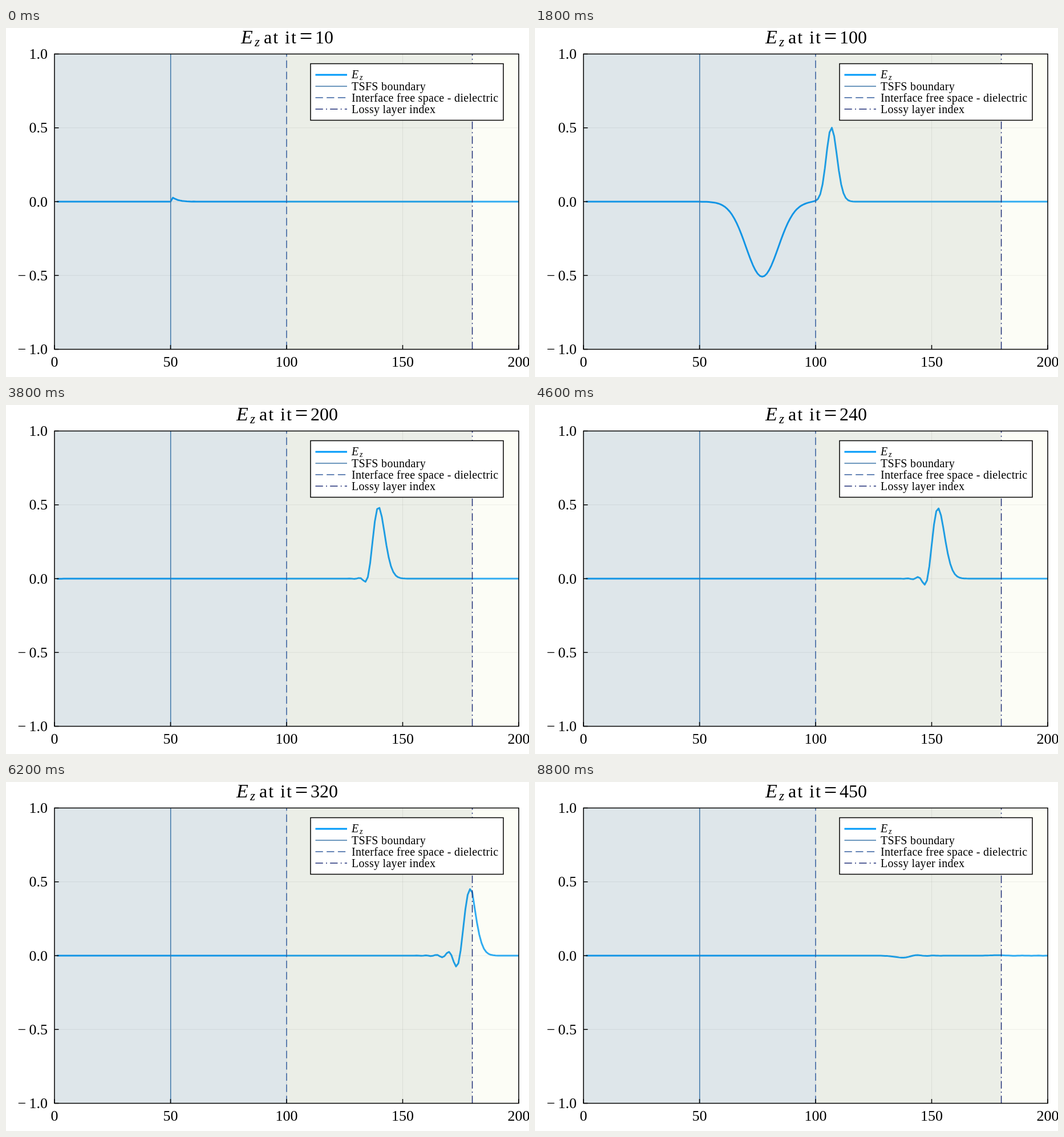
Recreate the animation shown at these times as an HTML page. Size 917x611 px, loop 9000 ms.

```html
<!DOCTYPE html>
<html lang="en">
<head>
<meta charset="utf-8">
<title>FDTD pulse</title>
<style>
  html, body { margin: 0; width: 100%; height: 100%; overflow: hidden; background: #fff; }
  svg { display: block; width: 917px; height: 611px; }
  text { font-family: "Liberation Serif", "Times New Roman", serif; fill: #000; }
  .title { font-size: 32px; }
  .title .word { letter-spacing: 2px; }
  .tick { font-size: 26px; }
  .legend { font-size: 20px; letter-spacing: .3px; }
  .math { font-style: italic; }
  .field { fill: none; stroke: #009af9; stroke-width: 3; stroke-linejoin: round; }
  .grid { fill: none; stroke: #000; stroke-opacity: .1; stroke-width: .8; }
  .frame { fill: none; stroke: #000; stroke-width: 1.5; }
  .mark { fill: none; stroke-width: 1.5; }
  .source { stroke: #3d76a8; }
  .interface { stroke: #355e9f; stroke-dasharray: 13.3 6.4; }
  .lossy { stroke: #202f78; stroke-dasharray: 13.3 5.2 2 5.2; }
</style>
</head>
<body>
<svg viewBox="0 0 917 611">
  <g id="title" class="title">
    <text class="math" x="0" y="27" font-size="34">E</text>
    <text class="math" x="24" y="32" font-size="23">z</text>
    <text class="word" x="40" y="27">at</text>
    <text class="word" x="77" y="27">it</text>
    <text x="114" y="28" font-size="40" text-anchor="middle">=</text>
    <text id="count" x="130" y="27"></text>
  </g>
  <path id="grid" class="grid"/>
  <path id="field" class="field"/>
  <g fill-opacity=".2">
    <rect x="85" y="45.5" width="407" height="517" fill="#5a8296"/>
    <rect x="492" y="45.5" width="325.6" height="517" fill="#9baa87"/>
    <rect x="817.6" y="45.5" width="81.4" height="517" fill="#f0f5d2"/>
  </g>
  <path class="mark source" d="M288.7 562.5V45.5"/>
  <path class="mark interface" d="M492 562.5V45.5"/>
  <path class="mark lossy" d="M817.6 562.5V45.5"/>
  <path id="ticks" class="frame"/>
  <rect class="frame" x="85" y="45.5" width="814" height="517"/>
  <g id="labels" class="tick"></g>
  <rect x="534" y="62.5" width="338" height="99" fill="#fff" stroke="#000" stroke-width="1.5"/>
  <path class="field" d="M542.5 82H598"/>
  <path class="mark source" d="M542.5 102H598"/>
  <path class="mark interface" d="M542.5 122H598"/>
  <path class="mark lossy" d="M542.5 142H598"/>
  <g class="legend">
    <text class="math" x="606" y="88">E<tspan x="620" dy="3" font-size="14">z</tspan></text>
    <text x="606" y="109">TSFS boundary</text>
    <text x="606" y="129">Interface free space - dielectric</text>
    <text x="606" y="149">Lossy layer index</text>
  </g>
</svg>
<script>
const byId = id => document.getElementById(id);
const xOf = cell => 85 + cell * 4.07;
const yOf = value => 304 - value * 258.5;

function drawAxes() {
  let grid = '', ticks = '', labels = '';
  for (let cell = 0; cell <= 200; cell += 50) {
    grid += `M${xOf(cell)} 45.5V562.5`;
    ticks += `M${xOf(cell)} 562.5v-7.5`;
    labels += `<text x="${xOf(cell)}" y="593" text-anchor="middle">${cell}</text>`;
  }
  for (let value = -1; value <= 1; value += 0.5) {
    const minus = value < 0 ? '<tspan letter-spacing="5">−</tspan>' : '';
    grid += `M85 ${yOf(value)}H899`;
    ticks += `M85 ${yOf(value)}h7.5`;
    labels += `<text x="73" y="${yOf(value) + 8.7}" text-anchor="end">${minus}${Math.abs(value).toFixed(1)}</text>`;
  }
  byId('grid').setAttribute('d', grid);
  byId('ticks').setAttribute('d', ticks);
  byId('labels').innerHTML = labels;
}

// One-dimensional FDTD run; cells are numbered from 1, a curve is kept every 10 steps.
function simulate() {
  const size = 200, source = 50, dielectric = 100, lossy = 180;
  const impedance = 377, permittivity = 9, loss = 0.02;
  const ez = new Float64Array(size + 1), hy = new Float64Array(size + 1);
  const pulse = time => Math.exp(-((time - 30) ** 2) / 100);
  const keep = i => i < lossy ? 1 : (1 - loss) / (1 + loss);
  const gain = i => i < lossy ? 1 : 1 / (1 + loss);
  const curves = [];
  for (let step = 1; step <= 450; step++) {
    for (let i = 1; i < size; i++)
      hy[i] = keep(i) * hy[i] + gain(i) / impedance * (ez[i + 1] - ez[i]);
    hy[source] -= pulse(step) / impedance;
    ez[1] = ez[2];
    for (let i = 2; i <= size; i++) {
      const scale = impedance / (i < dielectric ? 1 : permittivity);
      ez[i] = keep(i) * ez[i] + gain(i) * scale * (hy[i] - hy[i - 1]);
    }
    ez[source + 1] += pulse(step + 1);
    if (step % 10 === 0)
      curves.push('M' + Array.from(ez.slice(1), (v, i) => `${xOf(i + 1).toFixed(2)} ${yOf(v).toFixed(2)}`).join('L'));
  }
  return curves;
}

drawAxes();
const curves = simulate();
let shown = -1;

function draw() {
  const index = Math.floor(performance.now() % 9000 / 200);
  if (index !== shown) {
    shown = index;
    const count = String(10 * (index + 1));
    byId('field').setAttribute('d', curves[index]);
    byId('count').textContent = count;
    byId('title').setAttribute('transform', `translate(${428 - 8 * count.length} 0)`);
  }
  requestAnimationFrame(draw);
}
draw();
</script>
</body>
</html>
```
